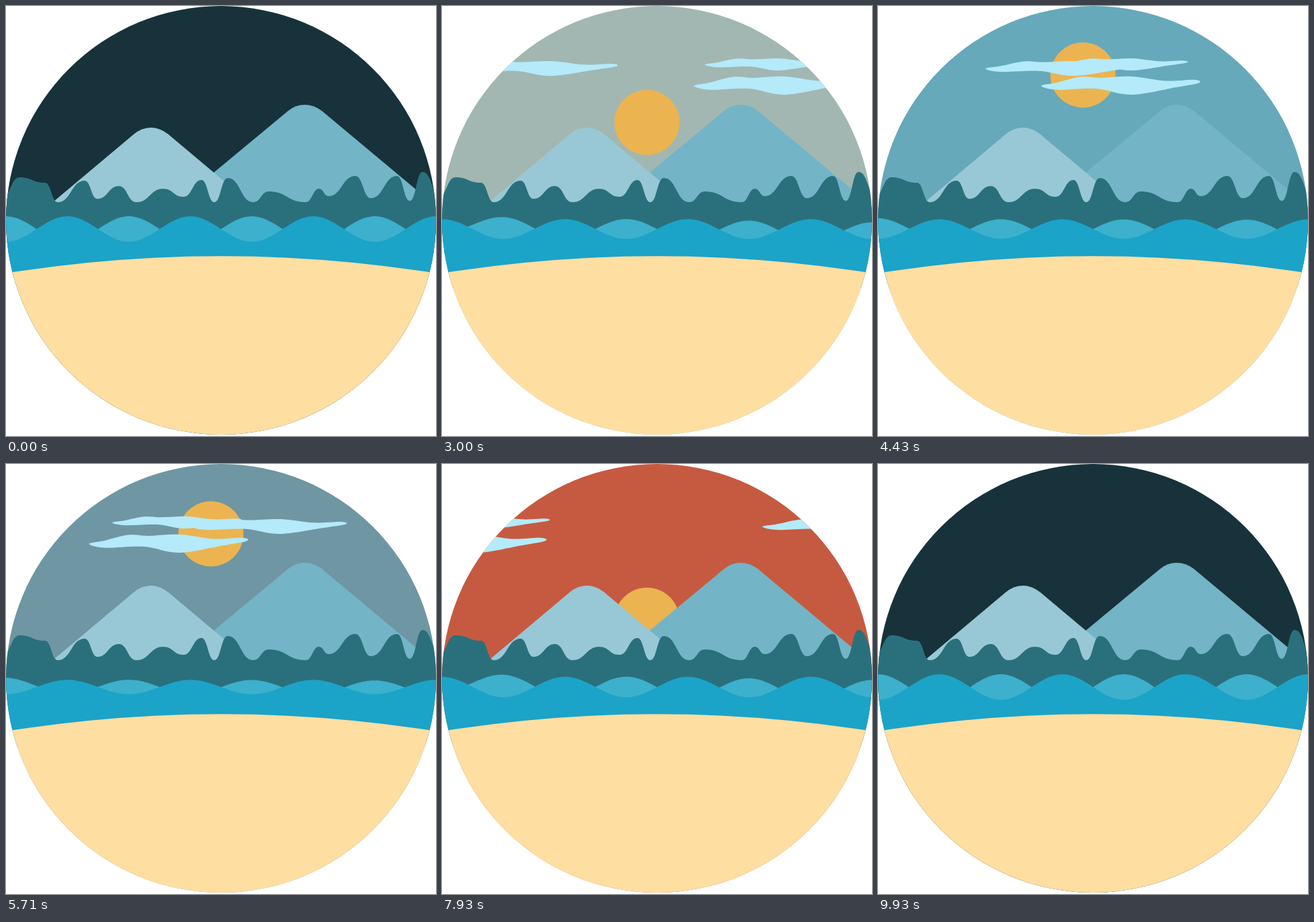
Recreate the animation shown at these times as an HTML page with a canvas. Size 640 by 640 pixels, loop 10000 ms.

```html
<!DOCTYPE html>
<html lang="en">
<head>
<meta charset="utf-8">
<title>A day at the beach</title>
<style>
  html, body { margin: 0; width: 100%; height: 100%; overflow: hidden; background: #fff; }
  canvas { display: block; }
</style>
</head>
<body>
<canvas id="stage" width="640" height="640"></canvas>
<script>
const ctx = document.getElementById('stage').getContext('2d');
const LOOP = 10000, STEPS = 140, NOON = .51;

const lerp = (a, b, k) => a + (b - a) * k;
const ease = k => k * k * (3 - 2 * k);
const softEase = k => (k + ease(k)) / 2;
const points = text => text.split(' ').map(s => s.split(',').map(Number));

// Skyline that is level at every peak and dip
function skyline(text, floor) {
  const p = points(text), path = new Path2D();
  path.moveTo(p[0][0], floor);
  path.lineTo(...p[0]);
  for (let i = 1; i < p.length; i++) {
    const [x0, y0] = p[i - 1], [x1, y1] = p[i], mid = (x0 + x1) / 2;
    path.bezierCurveTo(mid, y0, mid, y1, x1, y1);
  }
  path.lineTo(p[p.length - 1][0], floor);
  return path;
}

// Closed smooth curve through all points
function blob(text) {
  const p = points(text), n = p.length, path = new Path2D();
  path.moveTo(...p[0]);
  for (let i = 0; i < n; i++) {
    const [a, b, c, d] = [n - 1, 0, 1, 2].map(k => p[(i + k) % n]);
    path.bezierCurveTo(
      b[0] + (c[0] - a[0]) / 6, b[1] + (c[1] - a[1]) / 6,
      c[0] - (d[0] - b[0]) / 6, c[1] - (d[1] - b[1]) / 6, c[0], c[1]);
  }
  return path;
}

function disc(x, y, rx, ry = rx) {
  const path = new Path2D();
  path.ellipse(x, y, rx, ry, 0, 0, Math.PI * 2);
  return path;
}

function wave(heightAt) {
  const path = new Path2D();
  path.moveTo(-4, 420);
  for (let x = -4; x <= 644; x += 2) path.lineTo(x, 332 - heightAt(x));
  path.lineTo(644, 420);
  return path;
}

const stage = disc(320, 319, 320, 319);
const sand = disc(320, 2386.2, 2014);
const leftPeak = new Path2D('M20 333.7L190 191Q202 181 215.5 181T241 190.5L400 324Z');
const rightPeak = new Path2D('M200 338.4L420 156Q431 147 444.5 147T470 156L680 331.5Z');
const trees = skyline('-6,285 20,255 58,263 77,292 117,260 136,287 168,268 194,292 ' +
  '234,272 264,284 291,259 310,292 330,256 368,292 391,276 446,292 466,272 480,283 ' +
  '520,253 543,286 582,253 601,290 620,247 650,290', 345);

// One cloud in a 100 by 100 box, stretched for each use
const cloud = blob('0,51 10,33 25,2 38,7 58,0 79,24 97,18 100,35 85,60 57,100 35,67 10,73');
const clouds = [
  { from: -241, to: 658, y: 82, w: 229, h: 22 },
  { from: 649, to: -204, y: 78, w: 191, h: 18 },
  { from: 653, to: -267, y: 105, w: 235, h: 27 }
];

const skyKeys = [
  { at: 0, rgb: [23, 50, 58] },
  { at: .2, rgb: [195, 190, 174] },
  { at: .5, rgb: [88, 166, 188] },
  { at: .8, rgb: [198, 90, 65] },
  { at: 1, rgb: [23, 50, 58] }
];

function skyColor(t) {
  const i = Math.max(1, skyKeys.findIndex(key => key.at >= t));
  const a = skyKeys[i - 1], b = skyKeys[i];
  const k = softEase((t - a.at) / (b.at - a.at));
  return `rgb(${a.rgb.map((v, c) => Math.round(lerp(v, b.rgb[c], k)))})`;
}

const swell = x => Math.cos((x - 91.4) * Math.PI * 2 / 183);
// As it flips, the rear wave rises at the left and sinks at the right
const lean = x => 15 * Math.exp(-x / 62) - .0158 * Math.max(0, x - 300);

function fill(color, path) {
  ctx.fillStyle = color;
  ctx.fill(path);
}

function draw(t) {
  ctx.clearRect(0, 0, 640, 640);
  fill(skyColor(t), stage);
  ctx.save();
  ctx.clip(stage);

  const rise = ease(t < NOON ? t / NOON : (1 - t) / (1 - NOON));
  fill('#ebb450', disc(305, 313.7 - 220.5 * rise, 48.5));

  for (const c of clouds) {
    ctx.save();
    ctx.translate(lerp(c.from, c.to, t), c.y);
    ctx.scale(c.w / 100, c.h / 100);
    fill('#b4eafa', cloud);
    ctx.restore();
  }

  fill('#73b4c7', rightPeak);
  fill('#98c8d6', leftPeak);
  fill('#2a707c', trees);

  const flip = ease(1 - Math.abs(1 - (t * 4) % 2));
  const size = lerp(19, -19, flip);
  fill('#3cb0cc', wave(x => -size * swell(x) + flip * lean(x)));
  fill('#1ca3c8', wave(x => size * swell(x)));

  fill('#fedea1', sand);
  ctx.restore();
}

// The picture advances 14 times a second; the last step meets the first
function tick() {
  const step = Math.floor((performance.now() % LOOP + 5) / LOOP * STEPS) % STEPS;
  draw(step / (STEPS - 1));
  requestAnimationFrame(tick);
}
tick();
</script>
</body>
</html>
```
